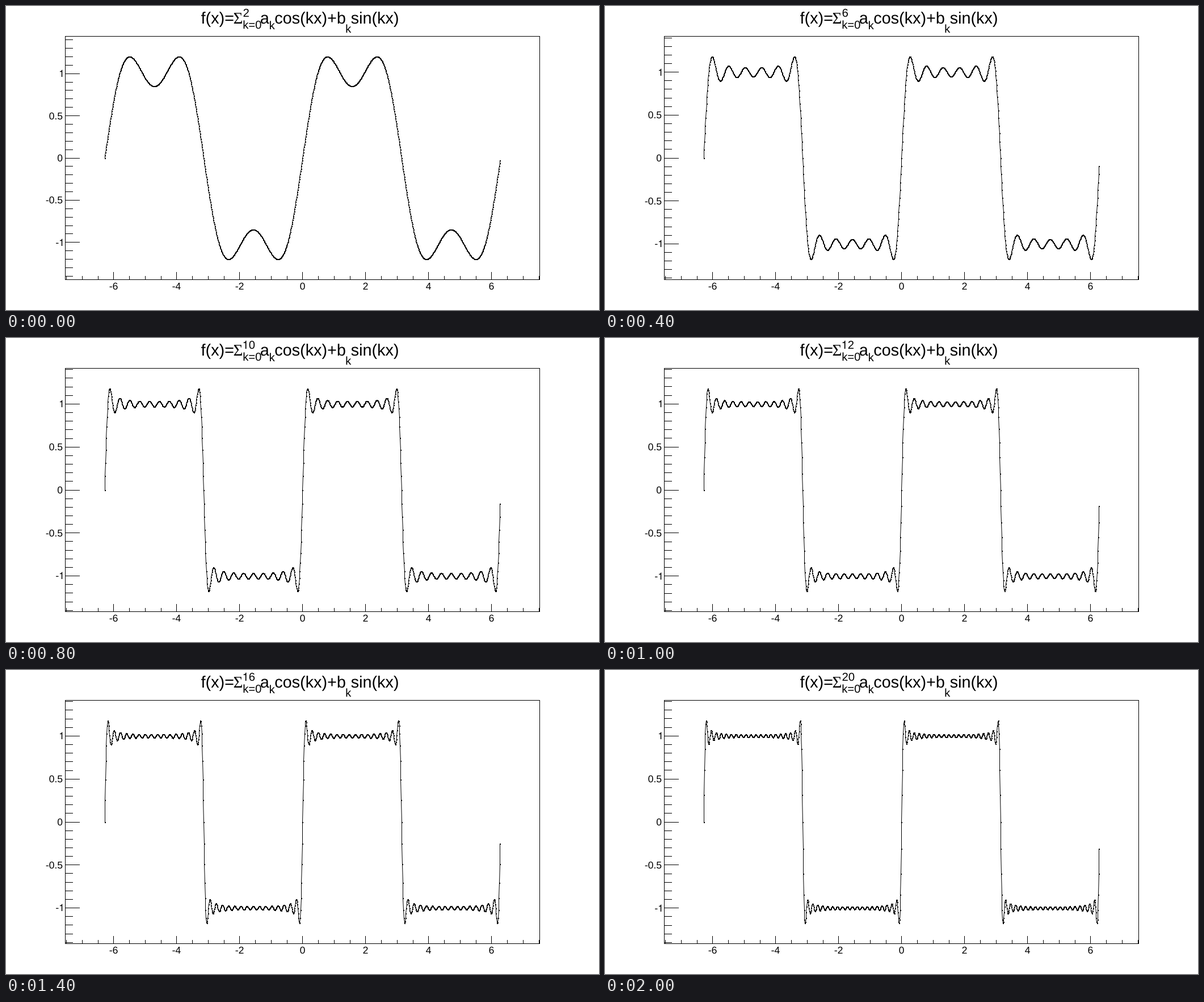
Write a matplotlib script that moves like this. It is 1045 by 536 pixels and loops after 2100 ms.

```python
import numpy as np
import matplotlib.pyplot as plt
from matplotlib.animation import FuncAnimation
from matplotlib.collections import PolyCollection
from matplotlib.patches import PathPatch
from matplotlib.path import Path
from matplotlib.textpath import TextPath

plt.rcParams["path.simplify"] = False

W, H, DPI = 1045, 536, 64
PX = 72 / DPI                      # points per pixel
LEFT, RIGHT = 0.1 * W, 0.9 * W
TOP, BOTTOM = 0.1 * H, 0.9 * H
LABEL, TITLE, SCRIPT = 17.5, 28.8, 20.2

STEP = 4 * np.pi / 1000
X = -2 * np.pi + STEP * np.arange(1000)
X_SCALE = (RIGHT - LEFT) / (1.2 * (X[-1] - X[0]))
X_START = LEFT + (RIGHT - LEFT) / 12

# Numeral one without a foot, in em units
ONE = Path([(.259, .505), (.259, 0), (.347, 0), (.347, .709), (.289, .709),
            (.258, .6), (.238, .585), (.102, .568), (.102, .505), (.259, .505)],
           [1, 2, 2, 2, 2, 4, 4, 4, 2, 79])


def pixel(v):
    return np.floor(np.asarray(v) + 1e-6)


def x_pixel(x):
    return X_START + (x - X[0]) * X_SCALE


def square_wave(n):
    k = 2 * np.arange(n)[:, None] + 1
    return (4 / np.pi * np.sin(k * X) / k).sum(axis=0)


def box(x0, y0, x1, y1):
    return [(x0, y0), (x1, y0), (x1, y1), (x0, y1)]


def outline(text, size, family):
    def part(s, x=0):
        return TextPath((x, 0), s, size=size, prop={"family": family})

    if "1" not in text:
        return part(text)
    head, tail = text.split("1")
    x = 0.333 * len(head) * size
    parts = [Path(ONE.vertices * size + (x, 0), ONE.codes)]
    if head:
        parts.append(part(head))
    if tail:
        parts.append(part(tail, x + 0.556 * size))
    return Path.make_compound_path(*parts)


def text_path(text, x, base, size, align=0.0, family="Liberation Sans"):
    """Outline with its ink aligned at x: 0 left, 0.5 centre, 1 right."""
    path = outline(text, size, family)
    verts, codes = np.array(path.vertices), path.codes
    ink = Path(verts, codes).get_extents()
    shift = x - ink.x0 - align * ink.width
    return Path(np.column_stack([verts[:, 0] + shift, base - verts[:, 1]]), codes)


fig = plt.figure(figsize=(W / DPI, H / DPI), dpi=DPI, facecolor="white")
ax = fig.add_axes([0, 0, 1, 1])
ax.set_xlim(0, W)
ax.set_ylim(H, 0)
ax.axis("off")


def add_text(*args, **kw):
    patch = PathPatch(text_path(*args, **kw), fc="black", ec="none", lw=0)
    return ax.add_patch(patch)


def add_boxes(boxes):
    fills = PolyCollection(boxes, facecolors="black", edgecolors="none",
                           linewidths=0)
    return ax.add_collection(fills, autolim=False)


# Frame and x axis, one pixel wide
x0, x1, y0, y1 = (float(pixel(v)) for v in (LEFT, RIGHT, TOP, BOTTOM))
fixed = [box(x0, y, x1 + 1, y + 1) for y in (y0, y1)]
fixed += [box(x, y0, x + 1, y1 + 1) for x in (x0, x1)]
for i in range(-15, 16):
    col = pixel(x_pixel(i / 2))
    major = i % 4 == 0
    fixed.append(box(col, 469 if major else 476, col + 1, y1))
    if major:
        add_text(str(i // 2), x_pixel(i / 2) - .3, 500, LABEL, align=.5)
add_boxes(fixed)

# Title
add_text("f(x)=", 344, 31, TITLE)
add_text("Σ", 401.7, 31, TITLE, family="Liberation Serif")
add_text("k=0", 418.6, 40, SCRIPT)
add_text("a", 449, 31, TITLE)
add_text("k", 465, 41, SCRIPT)
add_text("cos(kx)+b", 474.5, 31, TITLE)
add_text("k", 599.5, 47, SCRIPT)
add_text("sin(kx)", 608.5, 31, TITLE)
upper = add_text("2", 418.6, 19, SCRIPT)

# Moving parts
y_ticks = add_boxes([])
values = {"1": 1, "0.5": .5, "0": 0, "-0.5": -.5, "-1": -1}
y_labels = {s: add_text(s, 99.3, 0, LABEL, align=1) for s in values}
curve, = ax.plot([], [], color="black", lw=PX, snap=False)
dots = add_boxes([])
DOT = np.array(box(0, 0, 2, 2))


def update(frame):
    n = min(2 * (frame // 2 + 1), 20)
    y = square_wave(n)
    scale = (BOTTOM - TOP) / (1.2 * (y.max() - y.min()))
    middle = (TOP + BOTTOM) / 2

    points = pixel(np.column_stack([x_pixel(X), middle - y * scale]))
    curve.set_data(*(points + .5).T)
    dots.set_verts(points[:, None] + DOT)

    rows = [(i, pixel(middle - i / 10 * scale)) for i in range(-14, 15)]
    y_ticks.set_verts([box(x0, r, 130 if i % 5 == 0 else 118, r + 1)
                       for i, r in rows])
    for s, v in values.items():
        nudge = .35 if s.endswith("1") else .5
        base = pixel(middle - v * scale + nudge) + 6
        y_labels[s].set_path(text_path(s, 99.3, base, LABEL, align=1))
    upper.set_path(text_path(str(n), 418.6, 19, SCRIPT))
    return curve, dots, y_ticks, upper, *y_labels.values()


anim = FuncAnimation(fig, update, frames=21, interval=100, repeat=True,
                     repeat_delay=0, blit=False)
plt.show()
```
